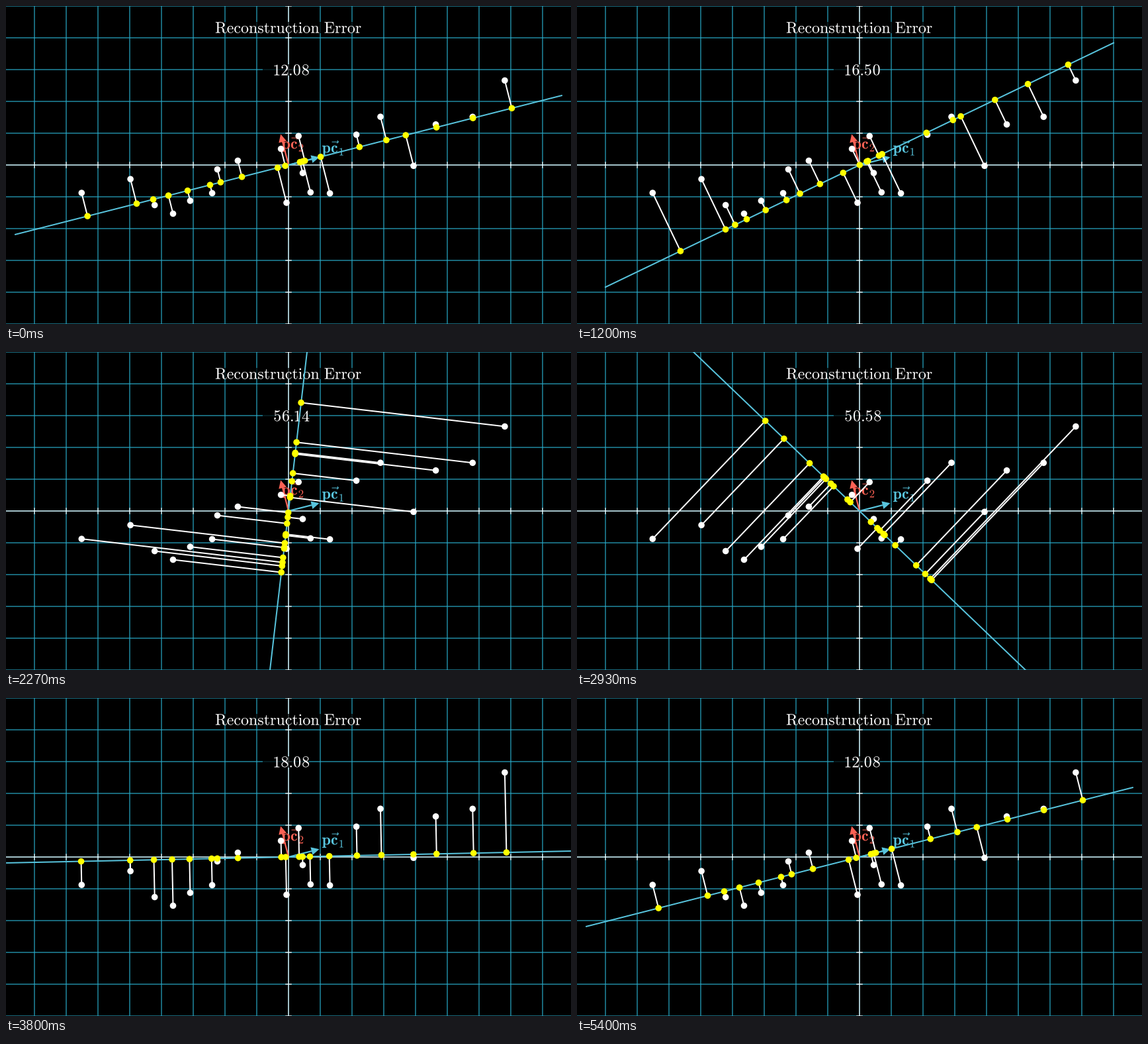
Recreate the animation shown at these times as a matplotlib script. Size 854 by 480 pixels, loop 5.47 s.

```python
import numpy as np
import matplotlib.pyplot as plt
from matplotlib.animation import FuncAnimation
from matplotlib.collections import LineCollection
from matplotlib.patches import Circle, PathPatch, Polygon, Rectangle
from matplotlib.path import Path
from matplotlib.textpath import TextPath
from matplotlib.transforms import Affine2D

plt.rcParams["mathtext.fontset"] = "cm"

W, H, DPI = 854, 480, 64
PT = 72 / DPI              # points per pixel
UNIT = 48                  # pixels per grid cell
EM = 24                    # text size in pixels
FRAMES, LOOP_MS = 82, 5470
TURN_FRAMES = 75           # the half turn, followed by a short rest

BLUE, GRID_BLUE, RED, YELLOW = "#58c4dd", "#29abca", "#fc6255", "#ffff00"

# Centred data, in pixels from the origin
POINTS = np.array([
    (-312.7, -42.1), (-238.9, -21.3), (-202.3, -60.5), (-174.5, -73.5),
    (-148.6, -54.0), (-115.4, -42.5), (-107.5, -6.6), (-76.6, 6.5),
    (-3.0, -57.0), (-11.4, 24.4), (15.2, 43.7), (21.5, -12.1),
    (33.3, -41.3), (62.6, -42.8), (102.6, 45.8), (139.0, 72.8),
    (189.0, -1.3), (222.6, 61.2), (278.3, 72.7), (326.9, 127.6),
])


def principal_angle(points):
    x, y = points.T
    return 0.5 * np.arctan2(2 * x @ y, x @ x - y @ y)


def smooth(t):
    """Sigmoid easing, rescaled to run from 0 to 1."""
    def sigmoid(u):
        return 1 / (1 + np.exp(-u))
    low = sigmoid(-5)
    return (sigmoid(10 * (t - 0.5)) - low) / (1 - 2 * low)


def direction(angle):
    return np.array([np.cos(angle), np.sin(angle)])


def moved(path, dx, dy):
    return path.transformed(Affine2D().translate(dx, dy))


def text_path(tex, x, baseline):
    """Outline of a formula whose ink starts at x."""
    path = TextPath((0, 0), f"${tex}$", size=EM)
    return moved(path, x - path.get_extents().x0, baseline)


GLYPHS = {c: TextPath((0, 0), rf"$\mathrm{{{c}}}$", size=EM)
          for c in "0123456789."}


def number_path(value, x=-21.6, bottom=135.4, gap=3):
    """Digits set side by side with equal gaps, resting on one line."""
    parts = []
    for c in f"{value:.2f}":
        box = GLYPHS[c].get_extents()
        parts.append(moved(GLYPHS[c], x - box.x0, bottom - box.y0))
        x += box.width + gap
    return Path.make_compound_path(*parts)


fig = plt.figure(figsize=(W / DPI, H / DPI), dpi=DPI, facecolor="black")
ax = fig.add_axes([0, 0, 1, 1])
ax.set_xlim(-W / 2, W / 2)
ax.set_ylim(-H / 2, H / 2)
ax.axis("off")


def add_lines(segments, color, width, z):
    lines = LineCollection(segments, colors=color, linewidths=width * PT,
                           zorder=z, snap=False, capstyle="butt")
    return ax.add_collection(lines, autolim=False)


def add_path(path, color, z=3):
    return ax.add_patch(PathPatch(path, fc=color, lw=0, zorder=z))


def add_backdrop(x, y, w, h):
    ax.add_patch(Rectangle((x, y), w, h, fc="black", alpha=0.75, lw=0,
                           zorder=2, snap=False))


def add_vector(angle, color):
    d = direction(angle)
    side = np.array([-d[1], d[0]]) * 6
    tip, base = d * UNIT, d * (UNIT - 12)
    add_lines([[(0, 0), base]], color, 2.2, 3)
    ax.add_patch(Polygon([tip, base + side, base - side], fc=color, lw=0,
                         zorder=3))


def add_dots(color, z):
    return [ax.add_patch(Circle(p, 4.8, fc=color, lw=0, zorder=z))
            for p in POINTS]


def vertical(x, h):
    return [(x, -h), (x, h)]


def horizontal(y, w):
    return [(-w, y), (w, y)]


# Plane with axes and ticks
cols, rows = UNIT * np.arange(-8, 9), UNIT * np.arange(-5, 6)
add_lines([vertical(x, H / 2) for x in cols]
          + [horizontal(y, W / 2) for y in rows], GRID_BLUE, 1.2, 0)
add_lines([vertical(0, H / 2), horizontal(0, W / 2)]
          + [vertical(x, 4.8) for x in cols if x]
          + [horizontal(y, 4.8) for y in rows if y], "white", 1.2, 1)

# Heading and counter
add_backdrop(-111, 199, 222, 17)
add_backdrop(-39, 135, 70, 17)
add_path(text_path(r"\mathrm{Reconstruction\ Error}", -110.2, 199.2), "white")
counter = add_path(number_path(0), "white")

# Principal components
START = principal_angle(POINTS)
add_vector(START, BLUE)
add_vector(START + np.pi / 2, RED)
add_path(text_path(r"\mathbf{p}\vec{\mathbf{c}}_1", 51, 18.5), BLUE)
add_path(text_path(r"\mathbf{p}\vec{\mathbf{c}}_2", -10, 24.5), RED)

# Turning line, residuals and projections
axis_line = add_lines([horizontal(0, W / 2)], BLUE, 2, 4)
residuals = add_lines([], "white", 2, 5)
add_dots("white", 6)
shadows = add_dots(YELLOW, 7)


def update(frame):
    angle = START + np.pi * smooth(min(frame / TURN_FRAMES, 1))
    d = direction(angle)
    feet = np.outer(POINTS @ d, d)
    axis_line.set_segments([[-d * W / 2, d * W / 2]])
    residuals.set_segments(np.stack([POINTS, feet], axis=1))
    for dot, foot in zip(shadows, feet):
        dot.center = foot
    error = np.linalg.norm(POINTS - feet, axis=1).sum() / UNIT
    counter.set_path(number_path(error))
    return [axis_line, residuals, counter, *shadows]


anim = FuncAnimation(fig, update, frames=FRAMES, interval=LOOP_MS / FRAMES,
                     repeat=True, repeat_delay=0, blit=False)
plt.show()
```
